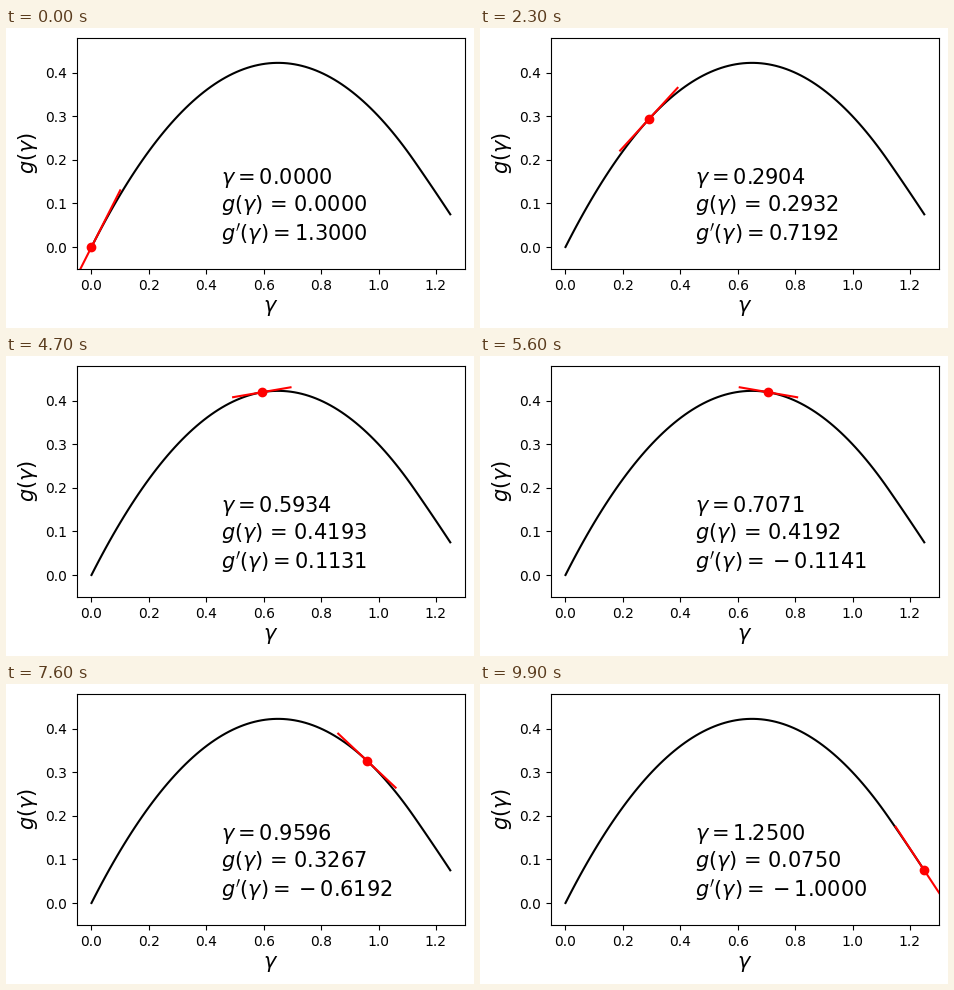
Recreate the animation shown at these times as a matplotlib script. Size 468 by 300 pixels, loop 10000 ms.

```python
import numpy as np
import matplotlib.pyplot as plt
from matplotlib.animation import FuncAnimation

W, H, DPI = 468, 300, 100
FRAMES, INTERVAL = 100, 100
STEP = 0.1    # half width of the tangent
KNEE = 1.125  # where the curve flattens out


def g(x):
    return 1.3 * x - x**2 + 0.8 * np.maximum(x - KNEE, 0)**2


def dg(x):
    return 1.3 - 2 * x + 1.6 * np.maximum(x - KNEE, 0)


def signed(value):
    minus = r"\hspace{0.2}{-}\hspace{0.2}" if value < 0 else ""
    return f"{minus}{abs(value):.4f}"


def caption(x):
    return (rf"$\gamma = {x:.4f}$" "\n"
            rf"$g(\gamma)$ = {g(x):.4f}" "\n"
            rf"$g'(\gamma) = {signed(dg(x))}$")


gammas = np.linspace(0, 1.25, FRAMES)

fig = plt.figure(figsize=(W / DPI, H / DPI), dpi=DPI)
ax = fig.add_axes([71.13 / W, 59.2 / H, 387.5 / W, 231 / H])
ax.set_xlim(-0.05, 1.3)
ax.set_ylim(-0.05, 0.48)
ax.set_xlabel(r"$\gamma$", fontsize=15)
ax.set_ylabel(r"$g(\gamma)$", fontsize=15)

ax.plot(gammas, g(gammas), "k")
tangent, = ax.plot([], [], "r")
dot, = ax.plot([], [], "ro")
label = ax.text(0.45, 0.015, "", fontsize=15)


def update(i):
    x = gammas[i]
    span = np.array([-STEP, STEP])
    tangent.set_data(x + span, g(x) + dg(x) * span)
    dot.set_data([x], [g(x)])
    label.set_text(caption(x))
    return tangent, dot, label


anim = FuncAnimation(fig, update, frames=FRAMES, interval=INTERVAL,
                     repeat=True, repeat_delay=0)
plt.show()
```
